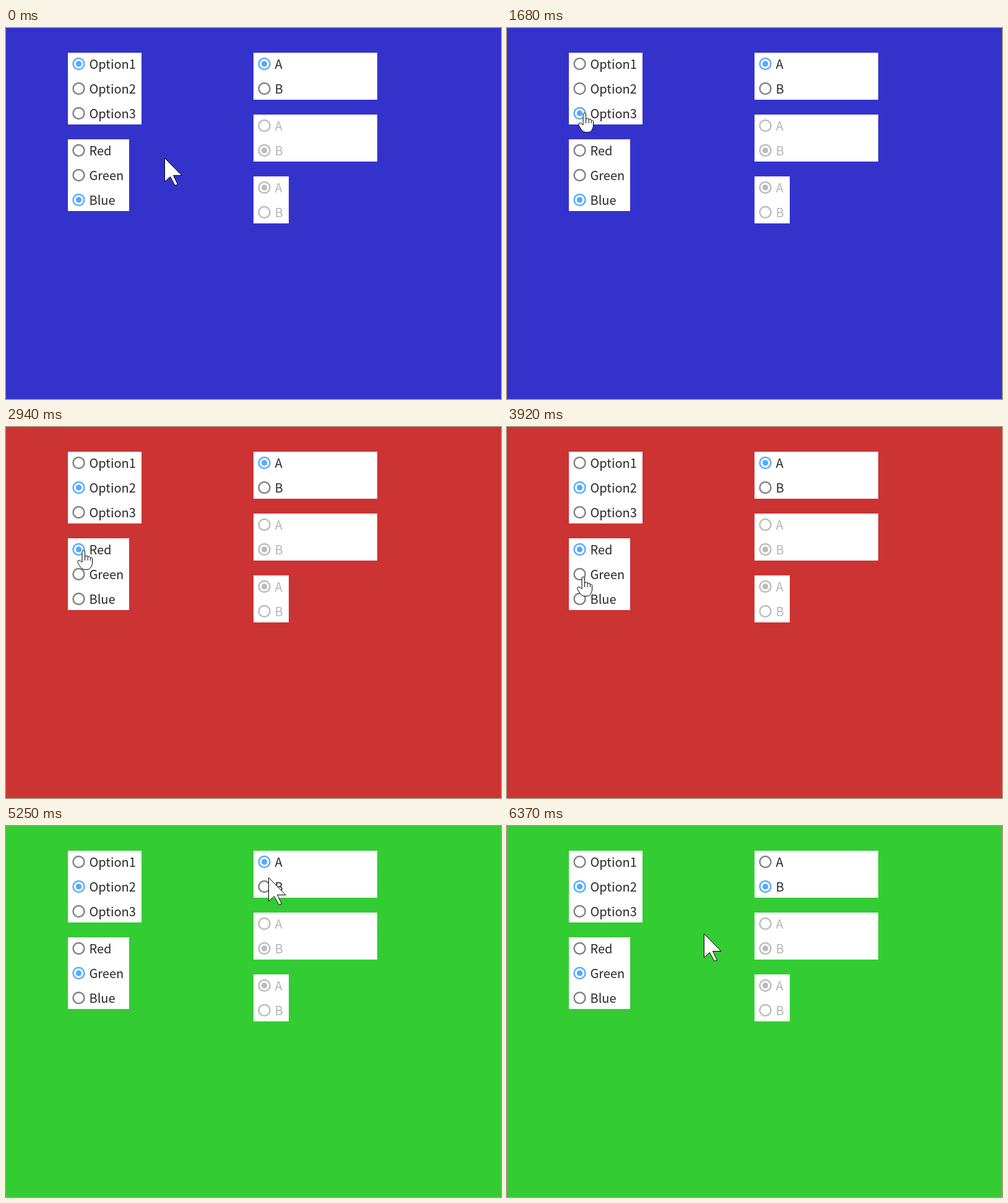
Animation, 800 px wide and 600 px high, one loop 6510 ms. Source, as an HTML page:

```html
<!DOCTYPE html>
<html lang="en">
<head>
<meta charset="utf-8">
<title>Radio groups</title>
<style>
  html, body { margin: 0; width: 100%; height: 100%; overflow: hidden; }
  svg { display: block; width: 800px; height: 600px; }
  text { font: 20px "Noto Sans CJK JP", "Noto Sans CJK SC", "Noto Sans CJK", sans-serif; fill: #262626; }
  .ring { fill: #fff; stroke: #808080; stroke-width: 2.4; }
  .dot { fill: none; }
  .on .ring { stroke: #5af; }
  .on .dot { fill: #5af; }
  .off text { fill: #b4b4b4; }
  .off .ring { stroke: #bbb; }
  .off .on .dot { fill: #bbb; }
  #cursor path { fill: #fff; stroke: #000; stroke-linejoin: round; }
</style>
</head>
<body>
<svg id="stage" viewBox="0 0 800 600">
  <g id="groups"></g>
  <g id="cursor">
    <path id="arrow" d="M.5.5V38.5L9.5 30.5L17 44.5L21.5 43L14.5 28.5H28Z"/>
    <g id="hand">
      <path d="M-2 19V2Q-2-.5 .3-.5T2.6 2V9Q7 7 7.2 10Q11 8.500 11.300 11.500Q14.500 10.500 14.500 14V20C14.500 24 12 25 11.500 28Q10.500 30.500 6 30.500H3C-2 30.500-4 27.500-6 24.500C-7.500 22-10 20-9.500 17.500Q-8-13 -2 19Z" style="display:none"/>
      <path d="M-2 19V2Q-2-.5 .3-.5T2.6 2V9Q7 7 7.2 10Q11 8.5 11.3 11.5Q14.5 10.5 14.5 14V20Q14.5 24 11.5 28Q10 30.5 6 30.5H3Q-3 30.5-6 24.5L-9 19.5Q-10 16-7 15.5Q-4.500 16-2 19Z"/>
      <path style="fill:none" d="M2.600 9V16M7.200 10V16M11.300 11.500V16"/>
    </g>
  </g>
</svg>
<script>
const LOOP = 6510, STEP = 70, HOVER_DELAY = 100, PAD = 12;
const $ = id => document.getElementById(id);

// picks: [time, selected index]
const groups = [
  { x: 100, y: 40, w: 119, labels: ["Option1", "Option2", "Option3"], picks: [[0, 0], [910, 1], [1680, 2], [2100, 1]] },
  { x: 100, y: 180, w: 99, labels: ["Red", "Green", "Blue"], picks: [[0, 2], [2940, 0], [4060, 1]] },
  { x: 400, y: 40, w: 200, labels: ["A", "B"], picks: [[0, 0], [5740, 1]] },
  { x: 400, y: 140, w: 200, labels: ["A", "B"], picks: [[0, 1]], off: true },
  { x: 400, y: 240, w: 57, labels: ["A", "B"], picks: [[0, 0]], off: true }
];
const colors = ["#c33", "#3c3", "#33c"];

// pointer moves: [start, end, x, y]
const moves = [
  [0, 630, 134, 94], [1050, 1540, 125, 138], [1680, 1960, 129, 98], [2100, 2800, 125, 200],
  [3150, 3500, 128, 241], [3780, 3920, 123, 243], [4270, 4410, 127, 268],
  [4830, 5250, 424, 83], [5250, 5530, 435, 98], [5950, 6370, 318, 174]
];

const row = (label, i) => `<g class="row" transform="translate(0 ${i * 40})">
  <circle class="ring" cx="17.5" cy="18" r="9"/><circle class="dot" cx="17.5" cy="18" r="4.7"/>
  <text x="34.5" y="26">${label}</text></g>`;

for (const g of groups) {
  g.h = g.labels.length * 40 - 4;
  $("groups").insertAdjacentHTML("beforeend", `<g class="${g.off ? "off" : ""}" transform="translate(${g.x} ${g.y})">
    <rect width="${g.w}" height="${g.h}" fill="#fff"/>${g.labels.map(row).join("")}</g>`);
  g.rows = $("groups").lastElementChild.querySelectorAll(".row");
}

const picked = (g, t) => g.picks.filter(p => p[0] <= t).pop()[1];

function pointer(t) {
  let x = 256, y = 210;
  for (const [start, end, toX, toY] of moves) {
    const u = Math.min(1, Math.max(0, (t - start) / (end - start))), s = u * u * (3 - 2 * u);
    x += (toX - x) * s;
    y += (toY - y) * s;
  }
  return [Math.round(x), Math.round(y)];
}

function hovers(t) {
  const [x, y] = pointer(t - HOVER_DELAY);
  return groups.some(g => !g.off && x >= g.x - PAD && x <= g.x + g.w + PAD && y >= g.y - PAD && y <= g.y + g.h + PAD);
}

function draw(now) {
  const t = Math.floor(now % LOOP / STEP) * STEP;
  for (const g of groups) {
    const n = picked(g, t);
    g.rows.forEach((r, i) => r.classList.toggle("on", i === n));
  }
  $("stage").style.background = colors[picked(groups[1], t)];
  const over = hovers(t);
  $("hand").style.display = over ? "" : "none";
  $("arrow").style.display = over ? "none" : "";
  $("cursor").setAttribute("transform", `translate(${pointer(t)})`);
  requestAnimationFrame(draw);
}
draw(0);
</script>
</body>
</html>
```
